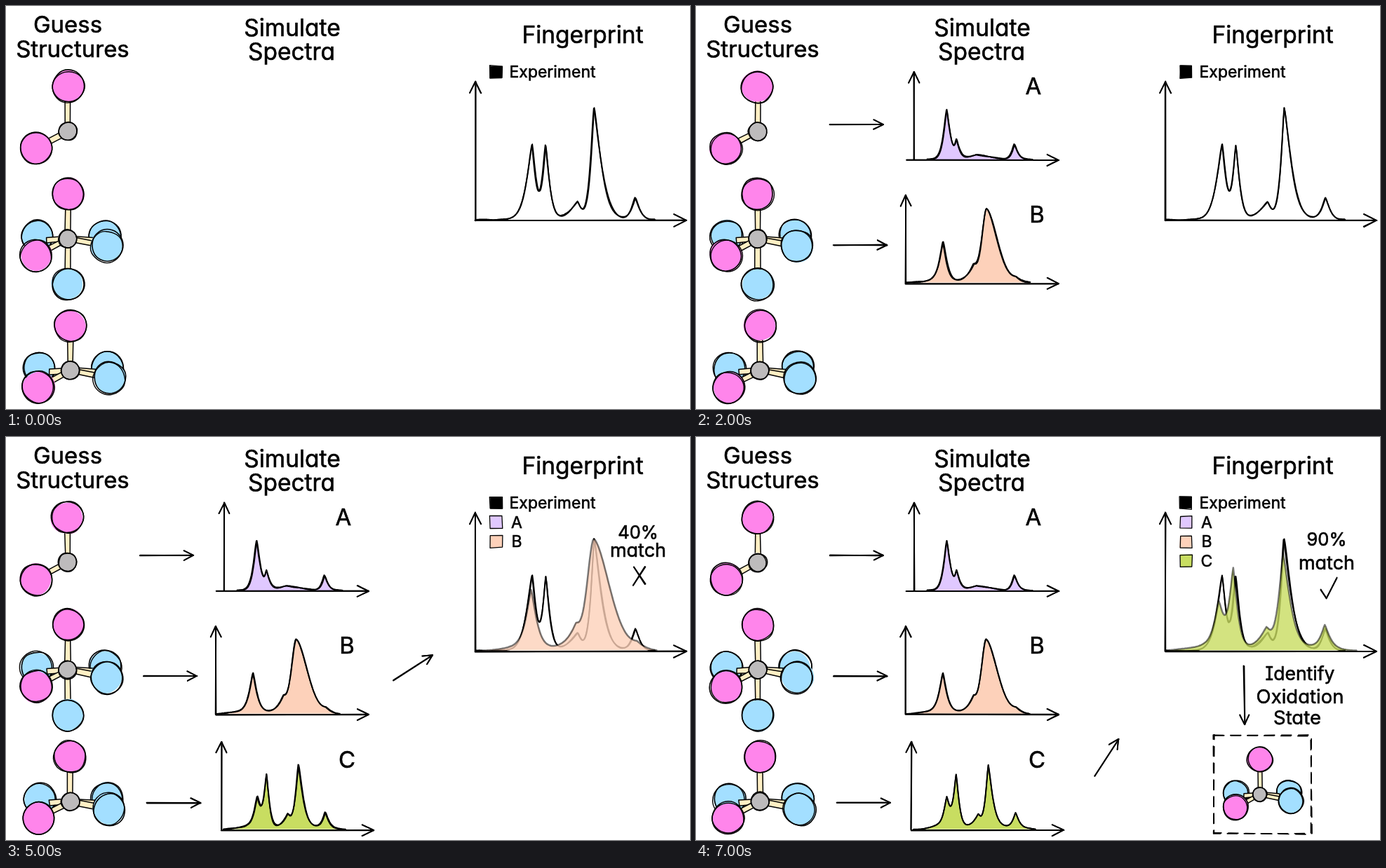
Recreate the animation shown at these times as an HTML page. Size 975 px wide and 575 px high, loop 8 s.

```html
<!DOCTYPE html>
<html lang="en">
<head>
<meta charset="utf-8">
<title>Spectral fingerprinting</title>
<style>
  html, body { margin: 0; width: 100%; height: 100%; overflow: hidden; background: #fff; }
  svg { display: block; width: 975px; height: 575px; }
  path { stroke-linecap: round; stroke-linejoin: round; }
  text {
    font-family: Inter, "Open Sans", sans-serif;
    font-feature-settings: "cv11", "cv08";
    text-anchor: middle;
    stroke: #000;
    stroke-width: .6;
    stroke-linejoin: round;
  }
</style>
</head>
<body>
<svg id="stage" viewBox="0 0 975 575"></svg>
<script>
const PINK = '#ff85eb', BLUE = '#a3dfff', GREY = '#bdbbbc', CREAM = '#ffefc4';

// Atoms as [dx, dy, colour, behind] around a grey centre.
const PINKS = [[0, -64, PINK], [-45, 24, PINK]];
const BLUES = [[-44, -3, BLUE, true], [53, -4, BLUE, true], [56, 11, BLUE]];
const BENT = PINKS;
const PYRAMID = [...BLUES, ...PINKS];
const OCTAHEDRON = [...BLUES, [0, 65, BLUE], ...PINKS];

// A spectrum is a sum of lopsided peaks: [centre, height, left width, right width, power].
function spectrum(base, from, to, peaks) {
  const height = x => peaks.reduce((sum, [centre, h, left, right, power = 1.3]) => {
    const distance = Math.abs(x - centre) / (x < centre ? left : right);
    return sum + h * Math.exp(-(distance ** power));
  }, 0);
  return Array.from({ length: to - from + 1 }, (_, i) => [from + i, base - height(from + i)]);
}

const FLOOR = 305;
const EXPERIMENT = spectrum(FLOOR, 670, 925, [
  [750, 106, 11, 7], [769, 103, 6, 7.5], [815, 25, 15, 7], [838, 159, 6.5, 14], [897, 31, 7, 8]]);

const CHARTS = [
  { name: 'A', color: '#e0c8ff', label: [481, 126], base: 219, axisX: 311, span: [300, 517],
    from: [191, 169], send: [545, 176, 607, 216], place: [357, 750, 1.52], verdict: ['35%', 899, 162, 33],
    curve: spectrum(219, 330, 480, [[357, 71, 6, 7], [371, 22, 3, 6], [400, 7, 16, 25], [454, 21, 5, 6]]) },
  { name: 'B', color: '#fdd1ba', label: [486, 309], base: 395, axisX: 299, span: [299, 517],
    from: [196, 341], send: [552, 347, 608, 311], place: [352, 749, 1.44], verdict: ['40%', 901, 145, 26],
    curve: spectrum(395, 300, 476, [
      [340, 4, 22, 40], [352, 55, 7, 7], [396, 23, 11, 10], [414, 103, 9, 22, 1.8], [456, 5, 8, 10]]) },
  { name: 'C', color: '#c8dd61', label: [486, 472], base: 560, axisX: 307, span: [307, 524],
    from: [201, 522], send: [568, 484, 602, 431], place: [358, 745, 1.56], verdict: ['90%', 899, 155, 34],
    curve: spectrum(560, 310, 484, [
      [345, 5, 18, 40], [358, 41, 6, 6], [371, 73, 5, 5.2], [402, 19, 10, 6], [417, 90, 5.6, 8.5],
      [450, 5, 20, 18], [455, 20, 4.5, 6]]) }
];

let seed = 1;
function random() {
  seed = (seed + 0x6D2B79F5) | 0;
  let t = Math.imul(seed ^ seed >>> 15, 1 | seed);
  t = t + Math.imul(t ^ t >>> 7, 61 | t) ^ t;
  return ((t ^ t >>> 14) >>> 0) / 4294967296;
}
const jitter = amount => (random() * 2 - 1) * amount;
const shake = (points, amount) => points.map(([x, y]) => [x + jitter(amount), y + jitter(amount)]);

// Slow drift along a dense curve, so it looks drawn by hand without turning fuzzy.
function drift(points, amount) {
  const phase = random() * 6.28;
  return points.map(([x, y], i) => [x + amount * Math.sin(i / 11 + phase), y + amount * Math.sin(i / 7 + phase)]);
}

const path = (d, fill, stroke = 'none', width = 1.5, extra = '') =>
  `<path d="${d}" fill="${fill}" stroke="${stroke}" stroke-width="${width}" ${extra}/>`;
const text = (x, y, size, content) => `<text x="${x}" y="${y}" font-size="${size}">${content}</text>`;
const polyline = points => 'M' + points.map(p => p.map(v => v.toFixed(1))).join('L');

function line(points, width = 1.9, amount = .6, extra = '') {
  const stroke = () => path(polyline(shake(points, amount)), 'none', '#000', width, extra);
  return stroke() + stroke();
}

function arrow([x1, y1, x2, y2], size = 15) {
  const angle = Math.atan2(y2 - y1, x2 - x1);
  const barb = turn => [x2 - size * Math.cos(angle + turn), y2 - size * Math.sin(angle + turn)];
  return line([[x1, y1], [x2, y2]]) + line([barb(.46), [x2, y2], barb(-.46)], 1.8, .4);
}

function quad(corners, fill, amount = .8, width = 1.5) {
  const closed = () => polyline(shake(corners, amount)) + 'Z';
  return path(closed(), fill) + path(closed(), 'none', '#000', width);
}

// Closed wobbly ring: quadratic arcs between midpoints of jittered corners.
function ring(x, y, r) {
  const count = 9, turn = random() * 6.28, cx = x + jitter(r * .04), cy = y + jitter(r * .04);
  const corners = Array.from({ length: count }, (_, i) => {
    const angle = turn + i * 2 * Math.PI / count, radius = r * (1.06 + jitter(.06));
    return [cx + radius * Math.cos(angle), cy + radius * Math.sin(angle)];
  });
  const middle = i => {
    const a = corners[i % count], b = corners[(i + 1) % count];
    return `${((a[0] + b[0]) / 2).toFixed(1)},${((a[1] + b[1]) / 2).toFixed(1)}`;
  };
  return 'M' + middle(0) + corners.map((_, i) => {
    const corner = corners[(i + 1) % count].map(v => v.toFixed(1));
    return `Q${corner} ${middle(i + 1)}`;
  }).join('') + 'Z';
}

const atom = (x, y, r, fill) => path(ring(x, y, r), fill)
  + path(ring(x, y, r), 'none', '#000', 1.6) + path(ring(x, y, r), 'none', '#000', 1.4);

function bond(x1, y1, x2, y2, width) {
  const length = Math.hypot(x2 - x1, y2 - y1);
  const nx = (y1 - y2) / length * width / 2, ny = (x2 - x1) / length * width / 2;
  return quad([[x1 + nx, y1 + ny], [x2 + nx, y2 + ny], [x2 - nx, y2 - ny], [x1 - nx, y1 - ny]], CREAM, .6);
}

function molecule(x, y, atoms, scale = 1) {
  const ball = ([dx, dy, fill]) => atom(x + dx * scale, y + dy * scale, 22.7 * scale, fill);
  const stick = ([dx, dy, , behind]) => {
    const ex = dx * scale, ey = (behind ? 3 : dy) * scale;
    return bond(x + ex * .15, y + ey * .15, x + ex * .68, y + ey * .68, 7.5 * scale);
  };
  return atoms.filter(a => a[3]).map(ball).join('')
    + atoms.map(stick).join('')
    + atom(x, y, 13 * scale, GREY)
    + atoms.filter(a => !a[3]).map(ball).join('');
}

const outline = points => path(polyline(drift(points, .5)), 'none', '#000', 2)
  + path(polyline(drift(points, .7)), 'none', '#000', 1.6);

function chart({ name, label, color, base, axisX, span, from: [x, y], curve }) {
  return arrow([x, y, x + 76, y])
    + path(polyline(curve) + 'Z', color) + outline(curve)
    + arrow([axisX, base, axisX, base - 125], 17)
    + arrow([span[0], base + 1, span[1], base + 1], 18)
    + text(...label, 33, name);
}

function overlay({ curve, base, color, place: [from, to, scale] }) {
  const points = curve.map(([x, y]) => [to + (x - from) * scale, FLOOR + (y - base) * 1.5]);
  return path(polyline(points) + 'Z', color, 'none', 0, 'opacity=".8"')
    + path(polyline(drift(points, .5)), 'none', '#000', 2.5, 'opacity=".52"');
}

function legend(row, label, color) {
  const x = 698.5, y = 94 + row * 27.6, r = 8.6;
  return quad([[x - r, y - r], [x + r, y - r], [x + r, y + r], [x - r, y + r]], color, .8, 1.3)
    + text(row ? 728 : 779, y + 8, 23, label);
}

function verdict([percent, x, y, gap], good) {
  const markX = x + 2, markY = y + gap + 27;
  const mark = points => line(points.map(([dx, dy]) => [markX + dx, markY + dy]), 1.9);
  return text(x, y, 25.5, percent) + text(x, y + gap, 27, 'match')
    + (good ? mark([[-10, 2], [-2, 14], [13, -15]])
            : mark([[-8, -13], [8, 12]]) + mark([[8, -13], [-9, 14]]));
}

function conclusion() {
  const box = [[738, 426], [877, 426], [877, 566], [738, 566], [738, 426]];
  return arrow([781, 327, 782, 410])
    + text(861, 347, 26.5, 'Identify') + text(861, 380, 27.5, 'Oxidation') + text(857, 410, 27.5, 'State')
    + line(box, 1.7, 1.2, 'stroke-dasharray="14 10"')
    + molecule(804, 510, PYRAMID, .78);
}

const titles = text(88, 38, 33, 'Guess') + text(95, 73, 33, 'Structures')
  + text(408, 43, 33.5, 'Simulate') + text(407, 77, 33.5, 'Spectra')
  + text(822, 53, 33.5, 'Fingerprint');

// One addition per second: three charts, three comparisons, then the conclusion.
function scene(step) {
  seed = 101 + step * 977;
  const match = Math.min(step - 4, 2);
  let out = titles
    + molecule(88, 179, BENT) + molecule(88, 332, OCTAHEDRON) + molecule(91.5, 520, PYRAMID)
    + CHARTS.slice(0, step).map(chart).join('')
    + outline(EXPERIMENT)
    + legend(0, 'Experiment', '#000');

  if (match >= 0) {
    const current = CHARTS[match];
    out += overlay(current) + arrow(current.send) + verdict(current.verdict, match === 2)
      + CHARTS.slice(0, match + 1).map((c, i) => legend(i + 1, c.name, c.color)).join('');
  }
  out += arrow([669, 306, 669, 108], 18) + arrow([669, 306, 970, 306], 20);
  return step === 7 ? out + conclusion() : out;
}

const stage = document.getElementById('stage');
let shown = -1;
function draw() {
  const step = Math.floor(performance.now() % 8000 / 1000);
  if (step !== shown) stage.innerHTML = scene(shown = step);
  requestAnimationFrame(draw);
}
draw();
</script>
</body>
</html>
```
